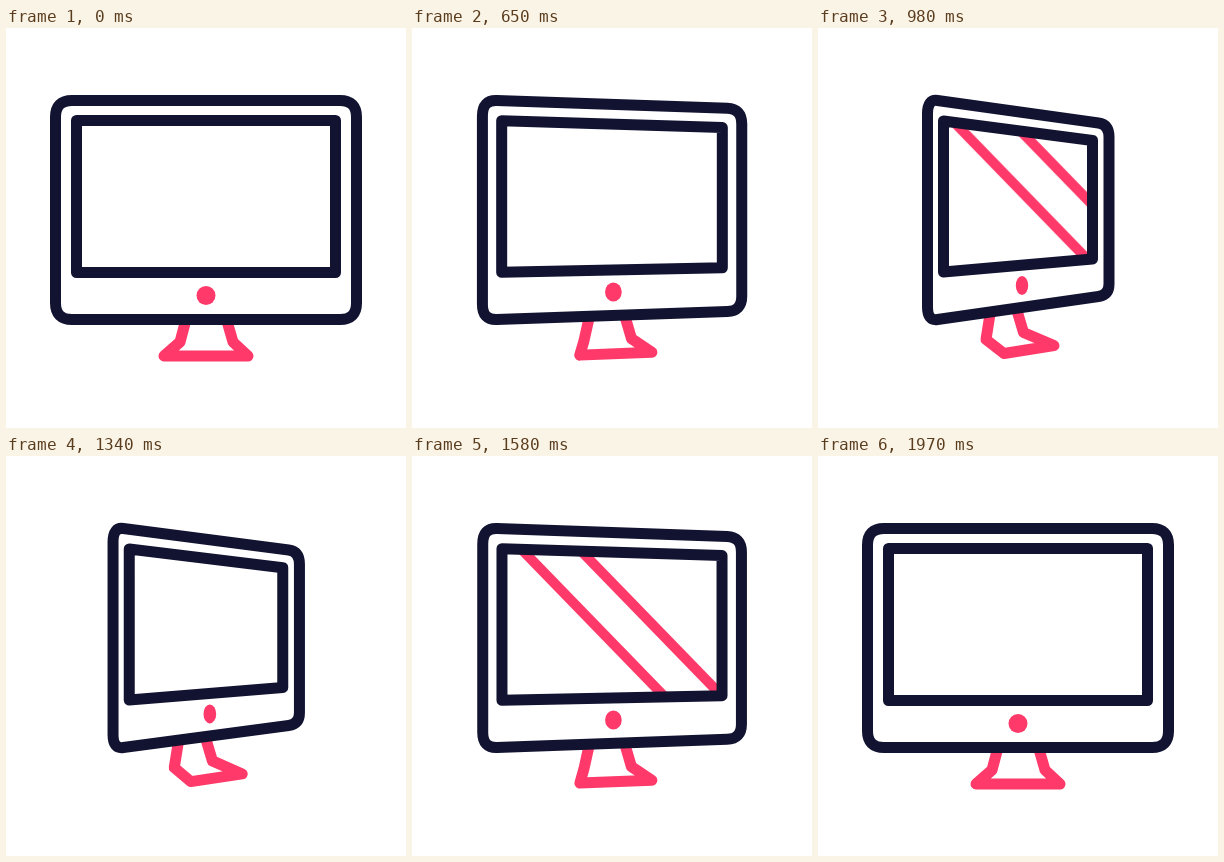
Write an HTML page that moves like this. It is 400x400 px and loops after 2150 ms.

```html
<!DOCTYPE html>
<html lang="en">
<head>
<meta charset="utf-8">
<title>Turning monitor</title>
<style>
  :root { --navy: #121331; --pink: #ff3a6a; --loop: 2150ms; }
  html, body { margin: 0; width: 100%; height: 100%; overflow: hidden; background: #fff; }
  body { position: relative; }
  svg { position: absolute; left: 0; top: 0; width: 400px; height: 400px; }
  path, line { fill: none; stroke-width: 11; stroke-linejoin: round; }

  /* Each shape holds a front pose and a turned pose. */
  .turn { d: var(--front); animation: turn var(--loop) infinite; }
  .body, .screen { stroke: var(--navy); }
  .stand { stroke: var(--pink); }
  .dot { fill: var(--pink); }

  .body {
    --front: path("M49.5 89Q49.5 72.5 66 72.5L334 72.5Q350.5 72.5 350.5 89L350.5 275Q350.5 291.5 334 291.5L66 291.5Q49.5 291.5 49.5 275Z");
    --turned: path("M109.5 86Q109.5 71 119.5 72.5L280.5 95Q291 96.5 291 109L291 256Q291 267 280.5 268.5L119.5 291.5Q109.5 293 109.5 279Z");
  }
  .screen {
    --front: path("M70.5 92.5L329.5 92.5L329.5 244.5L70.5 244.5Z");
    --turned: path("M125.5 93L274.5 112.5L274.5 231L125.5 244Z");
  }
  .stand {
    --front: path("M180 291.5L174 314L158 328L242 328L227 314L220.5 291.5");
    --turned: path("M172.5 283L168 311.5L186 325.5L236 317.5L205.5 304.5L198.5 281");
  }
  .dot {
    --front: path("M190.5 267.5A9.5 9.5 0 0 1 209.5 267.5A9.5 9.5 0 0 1 190.5 267.5Z");
    --turned: path("M197.8 257.5A6.2 9.5 0 0 1 210.2 257.5A6.2 9.5 0 0 1 197.8 257.5Z");
  }

  .glass {
    --front: polygon(70.5px 92.5px, 329.5px 92.5px, 329.5px 244.5px, 70.5px 244.5px);
    --turned: polygon(125.5px 93px, 274.5px 112.5px, 274.5px 231px, 125.5px 244px);
    clip-path: var(--front);
    animation: turn-glass var(--loop) infinite;
  }
  .shine { stroke: var(--pink); animation: sweep var(--loop) infinite; }
  .shine line { stroke-width: 10; }

  @keyframes turn {
    0%, 100% { d: var(--front); }
    23.02% { d: var(--front); animation-timing-function: cubic-bezier(.4, 0, .3, 1); }
    45.58% { d: var(--turned); }
    58.14% { d: var(--turned); animation-timing-function: cubic-bezier(.4, 0, .3, 1); }
    91.63% { d: var(--front); }
  }
  @keyframes turn-glass {
    0%, 100% { clip-path: var(--front); }
    23.02% { clip-path: var(--front); animation-timing-function: cubic-bezier(.4, 0, .3, 1); }
    45.58% { clip-path: var(--turned); }
    58.14% { clip-path: var(--turned); animation-timing-function: cubic-bezier(.4, 0, .3, 1); }
    91.63% { clip-path: var(--front); }
  }
  @keyframes sweep {
    0%, 100% { transform: translateX(-20px); }
    25.81% { transform: translateX(-20px); animation-timing-function: ease-in-out; }
    60% { transform: translateX(430px); animation-timing-function: ease-in-out; }
    89.77% { transform: translateX(-20px); }
  }
</style>
</head>
<body>
<svg class="glass" viewBox="0 0 400 400">
  <g class="shine">
    <line x1="-100" y1="65" x2="100" y2="271"/>
    <line x1="-158" y1="65" x2="42" y2="271"/>
  </g>
</svg>
<svg viewBox="0 0 400 400">
  <path class="turn stand"/>
  <path class="turn dot"/>
  <path class="turn screen"/>
  <path class="turn body"/>
</svg>
</body>
</html>
```
